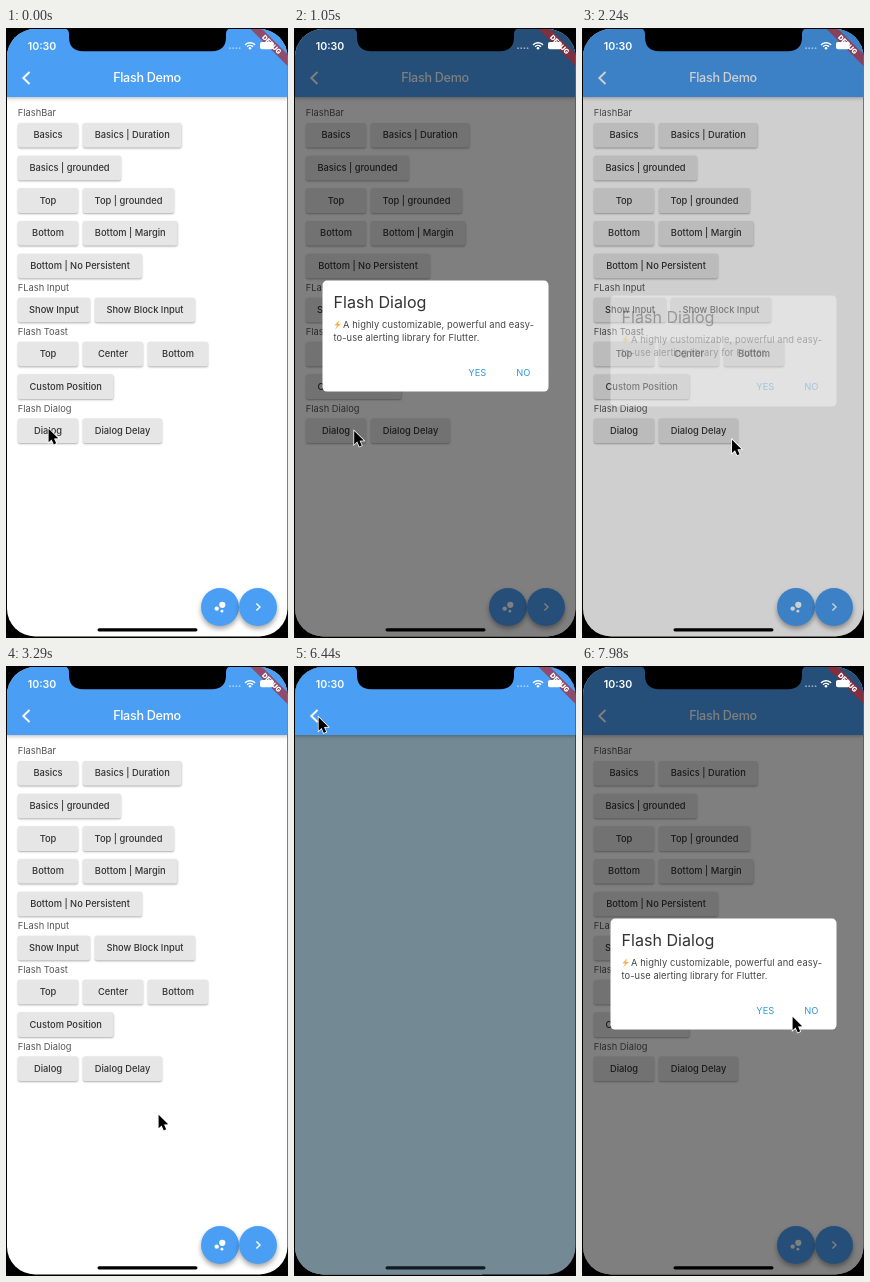
Recreate the animation shown at these times as an HTML page with a canvas. Size 282 by 610 pixels, loop 8 s.

```html
<!DOCTYPE html>
<html lang="en">
<head>
<meta charset="utf-8">
<title>Flash Demo</title>
<style>
html, body { margin: 0; width: 100%; height: 100%; overflow: hidden; background: #000; }
canvas { display: block; width: 100vw; height: 100vh; }
</style>
</head>
<body>
<canvas id="stage"></canvas>
<script>
const W = 282, H = 610, LOOP = 8000, STEP = 70;
const BLUE = '#4a9ff4', SLATE = '#738a95';
const FONT = 'Inter, Roboto, sans-serif';
const canvas = document.getElementById('stage');
const ctx = canvas.getContext('2d');

// x, width, centre y, caption
const BUTTONS = [
  [12, 60, 107.3, 'Basics'], [77, 98.5, 107.3, 'Basics | Duration'],
  [12, 103, 140, 'Basics | grounded'],
  [12, 60, 172.6, 'Top'], [77, 91, 172.6, 'Top | grounded'],
  [12, 60, 205.3, 'Bottom'], [77, 94.5, 205.3, 'Bottom | Margin'],
  [12, 124, 238, 'Bottom | No Persistent'],
  [12, 72, 282, 'Show Input'], [89, 100, 282, 'Show Block Input'],
  [12, 60, 326, 'Top'], [77, 60, 326, 'Center'], [142, 60, 326, 'Bottom'],
  [12, 95.5, 358.6, 'Custom Position'],
  [12, 60, 402.7, 'Dialog'], [77, 79, 402.7, 'Dialog Delay']
];
const LABELS = [['FlashBar', 85], ['FLash Input', 259.5], ['Flash Toast', 303.5], ['Flash Dialog', 380.3]];

// time, x, y of the pointer tip
const POINTER = [
  [0, 42, 400], [840, 42, 400], [1680, 154.5, 414], [2100, 154.5, 414],
  [2450, 140, 405], [3050, 140, 405], [3290, 152, 448], [3850, 252.5, 572],
  [4740, 252.5, 572], [5560, 96, 150], [6090, 24, 50.5], [6500, 24, 50.5],
  [7000, 60, 110], [7770, 204, 346], [7980, 210, 350]
];

const clamp = v => Math.min(1, Math.max(0, v));
const span = (t, from, len) => clamp((t - from) / len);
const smooth = v => v * v * (3 - 2 * v);

function bezier(x1, y1, x2, y2) {
  const at = (s, a, b) => 3 * (1 - s) * (1 - s) * s * a + 3 * (1 - s) * s * s * b + s ** 3;
  return x => {
    let lo = 0, hi = 1;
    for (let i = 0; i < 24; i++) {
      const mid = (lo + hi) / 2;
      if (at(mid, x1, x2) < x) lo = mid; else hi = mid;
    }
    return at(lo, y1, y2);
  };
}
const slide = bezier(0.35, 0.91, 0.33, 0.97);

function text(str, x, y, size, color, weight = 400, align = 'left', spacing = 0) {
  ctx.font = `${weight} ${size}px ${FONT}`;
  ctx.letterSpacing = spacing + 'px';
  ctx.textAlign = align;
  ctx.fillStyle = color;
  ctx.fillText(str, x, y);
}

function shadow(color = 'transparent', blur = 0, dy = 0) {
  ctx.shadowColor = color;
  ctx.shadowBlur = blur * scale;
  ctx.shadowOffsetY = dy * scale;
}

function box(x, y, w, h, r, color) {
  ctx.fillStyle = color;
  ctx.beginPath();
  ctx.roundRect(x, y, w, h, r);
  ctx.fill();
}

function disc(x, y, r, color) {
  ctx.fillStyle = color;
  ctx.beginPath();
  ctx.arc(x, y, r, 0, Math.PI * 2);
  ctx.fill();
}

function trace(points) {
  ctx.beginPath();
  for (const [x, y] of points) ctx.lineTo(x, y);
}

function line(points, width, color) {
  trace(points);
  ctx.strokeStyle = color;
  ctx.lineWidth = width;
  ctx.stroke();
}

function appBar(title) {
  shadow('rgba(0,0,0,.3)', 4, 1);
  box(0, 0, W, 69, 0, BLUE);
  shadow();
  line([[23.5, 44], [17.3, 50], [23.5, 56]], 1.9, '#fff');
  text(title, 141, 54.4, 12.6, '#fff', 500, 'center', -0.3);
}

function button([x, w, cy, caption]) {
  shadow('rgba(0,0,0,.32)', 2, 1);
  box(x, cy - 12.3, w, 24.6, 2, '#e6e6e6');
  shadow();
  text(caption, x + w / 2, cy + 3.1, 9.3, '#333', 500, 'center');
}

function fab(x) {
  shadow('rgba(0,0,0,.35)', 5, 3);
  disc(x, 579, 19, BLUE);
  shadow();
}

function dialog(a) {
  ctx.save();
  ctx.globalAlpha = a;
  ctx.translate(0, 24 * (1 - a));
  box(28.5, 252.6, 226, 111, 4.5, '#fff');
  text('Flash Dialog', 39.5, 279.8, 16.1, '#333');
  trace([[45.6, 292], [40.4, 297.3], [43.2, 297.5], [41, 301.6], [46.8, 296], [44, 295.7]]);
  ctx.fillStyle = '#f5b54a';
  ctx.fill();
  text('A highly customizable, powerful and easy-', 49, 300.3, 9.3, '#444', 400, 'left', 0.1);
  text('to-use alerting library for Flutter.', 39.5, 313.3, 9.3, '#444', 400, 'left', 0.1);
  text('YES', 183.3, 347.5, 9.3, '#3298d8', 400, 'center', 0.1);
  text('NO', 229.3, 347.5, 9.3, '#3298d8', 400, 'center', 0.1);
  ctx.restore();
}

function dialogState(t) {
  if (t < 1930) {
    const v = span(t, 20, 500);
    return { dim: v / 2, alpha: 1 - (1 - v) ** 2 };
  }
  const v = t < 4800 ? 1 - span(t, 1930, 500) : 1;
  return { dim: v / 2, alpha: v };
}

function homePage(t) {
  box(0, 0, W, H, 0, '#fff');
  appBar('Flash Demo');
  for (const [caption, y] of LABELS) text(caption, 11.8, y + 3.3, 9.3, '#555');
  BUTTONS.forEach(button);
  fab(214);
  disc(210.7, 580.6, 2.2, '#fff');
  disc(215.9, 583.2, 1.4, '#fff');
  disc(216.3, 576.8, 3.1, '#fff');
  fab(252);
  line([[250.4, 575.4], [254, 579], [250.4, 582.6]], 1.4, '#fff');

  const { dim, alpha } = dialogState(t);
  if (dim > 0) box(0, 0, W, H, 0, `rgba(0,0,0,${dim})`);
  if (alpha > 0) dialog(alpha);
}

function nextPage(x) {
  ctx.save();
  ctx.translate(x, 0);
  if (x > 0) {
    const edge = ctx.createLinearGradient(-14, 0, 0, 0);
    edge.addColorStop(0, 'rgba(0,0,0,0)');
    edge.addColorStop(1, 'rgba(0,0,0,.2)');
    box(-14, 0, 14, H, 0, edge);
  }
  box(0, 0, W, H, 0, SLATE);
  appBar('');
  ctx.restore();
}

function banner() {
  ctx.save();
  ctx.translate(W, 0);
  ctx.rotate(Math.PI / 4);
  box(-40, 19, 80, 8.2, 0, 'rgba(183,28,28,.63)');
  text('DEBUG', 0, 25.6, 6.9, '#fff', 900, 'center');
  ctx.restore();
}

function statusBar() {
  text('10:30', 36, 21.8, 10.6, '#fff', 600, 'center');
  for (let i = 0; i < 4; i++) disc(224 + i * 3.2, 20.2, 0.9, 'rgba(255,255,255,.5)');
  ctx.strokeStyle = '#fff';
  ctx.lineWidth = 1.4;
  for (const r of [3.9, 6.6]) {
    ctx.beginPath();
    ctx.arc(244, 21.3, r, -Math.PI * 0.77, -Math.PI * 0.23);
    ctx.stroke();
  }
  disc(244, 20.2, 1.3, '#fff');
  box(254, 14, 13.5, 7.2, 2, '#fff');
}

function notch() {
  ctx.fillStyle = '#000';
  ctx.beginPath();
  ctx.moveTo(58, 0);
  ctx.quadraticCurveTo(63, 1, 63, 6);
  ctx.lineTo(63, 10);
  ctx.quadraticCurveTo(63.5, 23, 77, 23.3);
  ctx.lineTo(206, 23.3);
  ctx.quadraticCurveTo(219.5, 23, 220, 10);
  ctx.lineTo(220, 6);
  ctx.quadraticCurveTo(220, 1, 225, 0);
  ctx.fill();
}

function pointer(t) {
  let i = 0;
  while (i < POINTER.length - 2 && t >= POINTER[i + 1][0]) i++;
  const [t0, x0, y0] = POINTER[i], [t1, x1, y1] = POINTER[i + 1];
  const k = smooth(span(t, t0, t1 - t0));
  ctx.save();
  ctx.translate(x0 + (x1 - x0) * k, y0 + (y1 - y0) * k);
  trace([[0.6, 0.8], [0.6, 14.2], [3.6, 11.4], [5.8, 16.4], [8.2, 15.3], [6, 10.5], [10.2, 10.3]]);
  ctx.closePath();
  ctx.lineWidth = 1.5;
  ctx.strokeStyle = '#fff';
  ctx.stroke();
  ctx.fillStyle = '#000';
  ctx.fill();
  ctx.restore();
}

function draw(t) {
  box(0, 0, W, H, 0, '#000');
  ctx.save();
  ctx.beginPath();
  ctx.roundRect(1, 1, 280.5, 607.5, 28);
  ctx.clip();

  // 0: home page, 1: next page fully in
  const shown = slide(span(t, 4090, 400)) - slide(span(t, 6440, 400));
  ctx.save();
  ctx.translate(-W / 3 * shown, 0);
  homePage(t);
  ctx.restore();
  if (shown > 0.001) nextPage(W * (1 - shown));

  banner();
  statusBar();
  box(91.5, 600.2, 100, 3.2, 1.6, shown > 0.5 ? '#101a20' : '#000');
  ctx.restore();
  notch();
  pointer(t);
}

let scale = 1;
function resize() {
  const ratio = window.devicePixelRatio || 1;
  canvas.width = Math.round(innerWidth * ratio);
  canvas.height = Math.round(innerHeight * ratio);
  scale = canvas.width / W;
}
addEventListener('resize', resize);
resize();

const start = performance.now();
function tick() {
  const t = (performance.now() - start) % LOOP;
  ctx.setTransform(canvas.width / W, 0, 0, canvas.height / H, 0, 0);
  draw(Math.floor(t / STEP) * STEP);
  requestAnimationFrame(tick);
}
tick();
</script>
</body>
</html>
```
